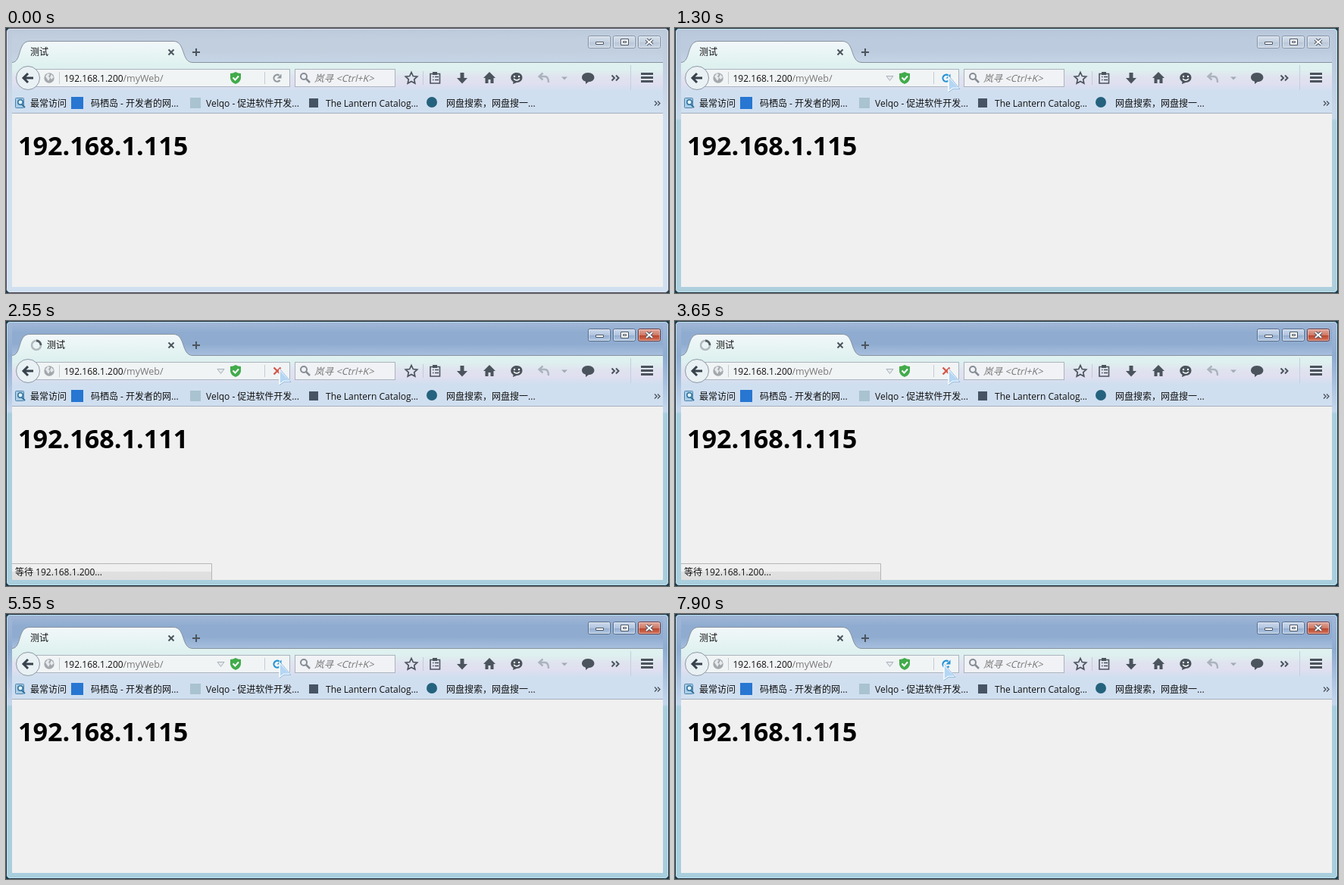
These frames come from a looping animation (875x350 px, 8000 ms). An HTML page:

```html
<!DOCTYPE html>
<html lang="zh">
<head>
<meta charset="utf-8">
<title>测试</title>
<style>
  html, body { margin: 0; width: 100%; height: 100%; overflow: hidden; }
  svg { display: block; width: 875px; height: 350px; }
  text { font: 12px "Open Sans", "Noto Sans CJK SC", "Noto Sans CJK", sans-serif; fill: #111; white-space: pre; }
  .heading { font-size: 34.2px; font-weight: 700; fill: #000; }
  .hint { font-size: 12.6px; fill: #777; }
  .path { font-size: 12.5px; fill: #777; }
  .icon { fill: #4b545d; }
  .line { fill: none; stroke: #4b545d; stroke-width: 2; }
</style>
</head>
<body>
<svg id="stage" viewBox="0 0 875 350"></svg>
<script>
const LOOP = 8000, STEP = 50;
const stage = document.getElementById('stage');

const rect = (x, y, w, h, fill, more = '') =>
  `<rect x="${x}" y="${y}" width="${w}" height="${h}" fill="${fill}" ${more}/>`;
const path = (d, more = '') => `<path d="${d}" ${more}/>`;
const circle = (x, y, r, more = '') => `<circle cx="${x}" cy="${y}" r="${r}" ${more}/>`;
const text = (x, y, s, more = '') => `<text x="${x}" y="${y}" ${more}>${s}</text>`;
const group = (id, content, more = '') => `<g id="${id}" ${more}>${content}</g>`;
const gradient = (id, ...stops) =>
  `<linearGradient id="${id}" x2="0" y2="1">${stops.map(([at, color]) =>
    `<stop offset="${at}" stop-color="${color}"/>`).join('')}</linearGradient>`;

// Window frame in its inactive, fading and active looks
const looks = [
  { id: 'inactive', edge: '#4d4a5c', glow: '#e4ecf5', top: '#bccadb', mid: '#c1cfdf', low: '#c7d6e7', upper: '#cfdded', lower: '#d0e0f0' },
  { id: 'fading', edge: '#23333c', glow: '#c4ecf7', top: '#b8c7da', mid: '#bccbde', low: '#c5d4e7', upper: '#c8d8eb', lower: '#aecfdd' },
  { id: 'active', edge: '#1f2c38', glow: '#c0ebf7', top: '#a2b7d7', mid: '#8facd0', low: '#a9c0df', upper: '#c6d6ec', lower: '#a9cedd' }
];

function windowButtons(active) {
  const face = active ? 'url(#buttonOn)' : 'url(#buttonOff)';
  const edge = active ? '#566b8b' : '#8592a5';
  const glyph = 'fill="#fff" stroke="#4c5665"';
  const button = (x, fill, stroke = edge) =>
    rect(x + .5, 10.5, 29, 16, fill, `rx="2" stroke="${stroke}"`) +
    rect(x + 1.5, 11.5, 27, 14, 'none', 'rx="1" stroke="#fff" stroke-opacity=".45"');
  const close = active ? button(834, 'url(#buttonRed)', '#6b3a40') : button(834, face);
  return button(768, face) + button(801, face) + close +
    path('M778.5 18.5h10v3h-10z', glyph) +
    path('M811.5 14.5h10v8h-10zM814.5 17.5h4v2h-4z', glyph) +
    path('M845 15l8 7M853 15l-8 7', 'stroke="#4c5665" stroke-width="4.2"') +
    path('M845 15l8 7M853 15l-8 7', 'stroke="#fff" stroke-width="2"');
}

function windowFrame({ id, edge, glow }) {
  return group(id,
    rect(0, 0, 875, 350, '#123f50') +
    rect(.5, .5, 874, 349, `url(#side-${id})`, `rx="5" stroke="${edge}"`) +
    rect(8, 2, 859, 44, `url(#title-${id})`) +
    rect(1.5, 1.5, 872, 347, 'none', `rx="4" stroke="${glow}" stroke-opacity=".8"`) +
    windowButtons(id === 'active'));
}

const defs = '<defs>' + looks.map(l =>
  gradient('title-' + l.id, [0, l.top], [.3, l.mid], [.65, l.mid], [1, l.low]) +
  gradient('side-' + l.id, [0, l.top], [.13, l.mid], [.34, l.upper], [.35, l.lower], [1, l.lower])
).join('') +
  gradient('buttonOff', [0, '#d5dfeb'], [.5, '#c5d1e0'], [.51, '#b8c6d8'], [1, '#c9d6e5']) +
  gradient('buttonOn', [0, '#cddaec'], [.5, '#b2c5df'], [.51, '#92acd0'], [1, '#b5cae3']) +
  gradient('buttonRed', [0, '#e3aa9e'], [.5, '#d07a66'], [.51, '#b9422a'], [1, '#d4755a']) +
  gradient('tabFill', [0, '#f2f7fa'], [1, '#e0f2f0']) +
  gradient('toolbarFill', [0, '#e0f2f0'], [.25, '#def0ef'], [.5, '#e0e4ef'], [.75, '#e0dff0'], [1, '#d0dfef']) +
  gradient('statusFill', [0, '#f0f0f0'], [.5, '#efefef'], [.52, '#e0e0e0'], [1, '#dfdfdf']) +
  '</defs>';

const tabOutline = 'M8 45.5C21 45 15 17.5 31 17.5H221C237 17.5 231 45 246 45.5';
const tabStrip =
  rect(8, 45, 859, 38, 'url(#toolbarFill)') +
  path(tabOutline + 'V47H8Z', 'fill="url(#tabFill)"') +
  path(tabOutline + 'H867', 'fill="none" stroke="#87929f"') +
  path('M214.5 28.5l7 7M221.5 28.5l-7 7', 'class="line"') +
  path('M246 32h10M251 27v10', 'class="line"');

const addressBar =
  rect(30.5, 54.5, 344, 23, '#f1f4f5', 'stroke="#aab4bf"') +
  circle(29, 66, 15.5, 'fill="#e9f1f4" stroke="#8c98a5"') +
  path('M36 66H24M29 60l-6 6 6 6', 'fill="none" stroke="#38424c" stroke-width="3"') +
  circle(57, 66, 6.7, 'fill="#a3a8ad"') +
  path('M52 64l3-4 3 1-2 3 2 2-2 4zM60 61l3 4-3 3-2-3z', 'fill="#e7eaec"') +
  path('M70.5 58v16M341.5 58v16', 'stroke="#c4cbd2"') +
  text(76.5, 71, '192.168.1.200') +
  text(154.5, 71, '/myWeb/', 'class="path"') +
  path('M303 58q3 2 7 2v6q0 5-7 8q-7-3-7-8v-6q4 0 7-2z', 'fill="#42ab4b"') +
  path('M299.5 65.5l3 3 4.5-5', 'fill="none" stroke="#fff" stroke-width="2"');

const searchBox =
  rect(381.5, 54.5, 132, 23, '#f1f2f5', 'stroke="#aab4bf"') +
  circle(393, 64, 4, 'fill="none" stroke="#858c94" stroke-width="2"') +
  path('M396 67l5 5', 'stroke="#858c94" stroke-width="2.5"') +
  text(0, 0, '岚寻 &lt;Ctrl+K&gt;', 'class="hint" transform="translate(407 71) skewX(-14)"');

const toolbarIcons =
  path('M535 58.5l2.3 5 5.4.6-4 3.7 1.1 5.4-4.8-2.7-4.8 2.7 1.1-5.4-4-3.7 5.4-.6z', 'class="line" style="stroke-width:1.7"') +
  path('M550.5 57v18', 'stroke="#c3cbd8"') +
  path('M560 60.5h12.5v12.5h-12.5zM563 64.5h1.5M566 64.5h5M563 68.5h1.5M566 68.5h5', 'class="line" style="stroke-width:1.6"') +
  rect(563, 58, 6, 4, '#4b545d') +
  path('M599.5 59h5v7h4.5l-7 7.5-7-7.5h4.5z', 'class="icon"') +
  path('M638 58l8 8h-2.5v7h-4v-5h-3v5h-4v-7H630z', 'class="icon"') +
  path('M674 59c10 0 10 13 0 13l-5 2 .5-3c-6-4-3-12 4.5-12z', 'class="icon"') +
  circle(671, 64, 1.2, 'fill="#fff"') + circle(677, 64, 1.2, 'fill="#fff"') +
  path('M670 67q4 4 8 0', 'fill="none" stroke="#fff" stroke-width="1.3"') +
  path('M704 64h7q5 0 5 8M708.5 59.5l-5 4.5 5 4.5', 'fill="none" stroke="#abb3bd" stroke-width="2.4"') +
  path('M733 64.5h8l-4 4z', 'fill="#a2abb5"') +
  path('M768 59c11 0 11 12 1 12l-4 3 0-3.3c-8-2-6-11.7 3-11.7z', 'class="icon"') +
  path('M799.5 62.5l3.5 3.5-3.5 3.5M805 62.5l3.5 3.5-3.5 3.5', 'class="line"') +
  path('M824.5 49v33', 'stroke="#c2cfdd"') +
  path('M838 60.5h16M838 65.5h16M838 70.5h16', 'class="line" style="stroke-width:3"');

const bookmarks =
  rect(8, 83, 859, 30, '#d0dff0') +
  path('M8 112.5H867', 'stroke="#a5b0bf"') +
  rect(12.5, 92.5, 11, 13, '#a9cde6', 'rx="1" stroke="#4d83ad"') +
  circle(19, 98, 3.2, 'fill="#e3f3fb" stroke="#32739e" stroke-width="1.5"') +
  path('M21 101l4 4', 'stroke="#32739e" stroke-width="2"') +
  text(32, 104, '最常访问') +
  rect(86, 91, 16, 16, '#2776d2') +
  text(112, 104, '码栖岛 - 开发者的网...') +
  rect(243, 92, 14, 14, '#a9c3d0') +
  text(264, 104, 'Velqo - 促进软件开发...') +
  rect(400, 93, 12, 12, '#465464') +
  text(422, 104, 'The Lantern Catalog...') +
  circle(562, 98, 7, 'fill="#24627e"') +
  text(581, 104, '网盘搜索，网盘搜一...') +
  path('M856 96.5l3 3-3 3M860 96.5l3 3-3 3', 'class="line" style="stroke-width:1.3"');

const dynamicParts =
  text(32, 36, '测试', 'id="tabTitle"') +
  group('spinner',
    circle(0, 0, 6, 'fill="none" stroke="#b3babf" stroke-width="2.5"') +
    path('M0-6A6 6 0 0 1 6 0', 'fill="none" stroke="#555d65" stroke-width="2.8"')) +
  path('M279 63.5h9l-4.5 6z', 'id="dropMarker" fill="#e4e9ec" stroke="#a9b1b8"') +
  group('reload',
    path('M361.5 69A4.5 4.5 0 1 1 360.5 62.5', 'fill="none" stroke="currentColor" stroke-width="2.2"') +
    path('M363.5 60.5v6h-6z', 'fill="currentColor"')) +
  path('M353.5 61.5l9 9M362.5 61.5l-9 9', 'id="stop" stroke="#d4574b" stroke-width="2.4"') +
  text(16, 168, '', 'id="heading" class="heading"') +
  group('status',
    rect(8, 320, 264, 22, 'url(#statusFill)') +
    path('M8 320.5H271.5V342', 'fill="none" stroke="#b6b6b6"') +
    text(12, 336, '等待 192.168.1.200...')) +
  group('cursor',
    path('M0 0V19.5L5.5 15.5H14.5Z', 'fill="#b4d6f4" stroke="#fff" stroke-width="1.4" stroke-linejoin="round"') +
    path('M0 20.5L6 16.3H15L.5-.5', 'fill="none" stroke="#7fb0dc" stroke-width=".9"'));

stage.innerHTML = defs + looks.map(windowFrame).join('') + tabStrip + addressBar + searchBox +
  toolbarIcons + bookmarks + rect(8, 113, 859, 229, '#f0f0f0') + dynamicParts;

const part = id => document.getElementById(id);
const show = (id, on) => { part(id).style.display = on ? '' : 'none'; };

// Each reload: start, new page, finish, button enabled again
const reloads = [
  { start: 1600, page: 1700, end: 1800, ready: 2300, status: true },
  { start: 2550, page: 2650, end: 2700, ready: 3200, status: true },
  { start: 3650, page: 3750, end: 3800, ready: 4300, status: true },
  { start: 4800, page: 4800, end: 5000, ready: 5550, status: false },
  { start: 6150, page: 6150, end: 6300, ready: 6950, status: false },
  { start: 7400, page: 7550, end: 7600, ready: 7750, status: true }
];

// Pointer stops: time, x, y
const pointerStops = [
  [50, 862, 214], [500, 350, 68], [850, 357, 75], [900, 357, 75], [950, 361, 79],
  [1050, 361, 64], [7700, 361, 64], [7800, 96, 140], [7900, 355, 67], [LOOP, 355, 67]
];

function pointerAt(t) {
  const next = Math.max(1, pointerStops.findIndex(stop => stop[0] > t));
  const [t0, x0, y0] = pointerStops[next - 1], [t1, x1, y1] = pointerStops[next];
  const u = Math.min(1, Math.max(0, (t - t0) / (t1 - t0)));
  const eased = u * u * (3 - 2 * u);
  return [x0 + (x1 - x0) * eased, y0 + (y1 - y0) * eased];
}

function draw(time) {
  const t = Math.floor(time / STEP) * STEP;
  const [x, y] = pointerAt(t);
  const loading = reloads.find(r => t >= r.start && t < r.end);
  const waiting = reloads.some(r => t >= r.end && t < r.ready);
  const pages = reloads.filter(r => t >= r.page).length;
  const inBar = t >= STEP && x > 41 && x < 375 && y > 54 && y < 78;
  const overReload = inBar && x > 342;

  show('inactive', t < 1300);
  show('fading', t >= 1300 && t < 1600);
  show('active', t >= 1600);

  part('tabTitle').setAttribute('x', loading ? 54 : 32);
  show('spinner', loading);
  part('spinner').setAttribute('transform',
    `translate(40 32) rotate(${loading ? (t - loading.start) * .45 : 0})`);
  show('status', loading && loading.status);
  show('stop', loading);
  show('reload', !loading);
  part('reload').style.color = waiting ? '#b2b8be' : overReload ? '#2793d5' : '#92999f';
  show('dropMarker', inBar);
  part('heading').textContent = '192.168.1.11' + (pages % 2 ? 1 : 5);

  show('cursor', t >= STEP);
  part('cursor').setAttribute('transform', `translate(${Math.round(x)} ${Math.round(y)})`);
}

const began = performance.now();
function tick() {
  draw((performance.now() - began) % LOOP);
  requestAnimationFrame(tick);
}
tick();
</script>
</body>
</html>
```
